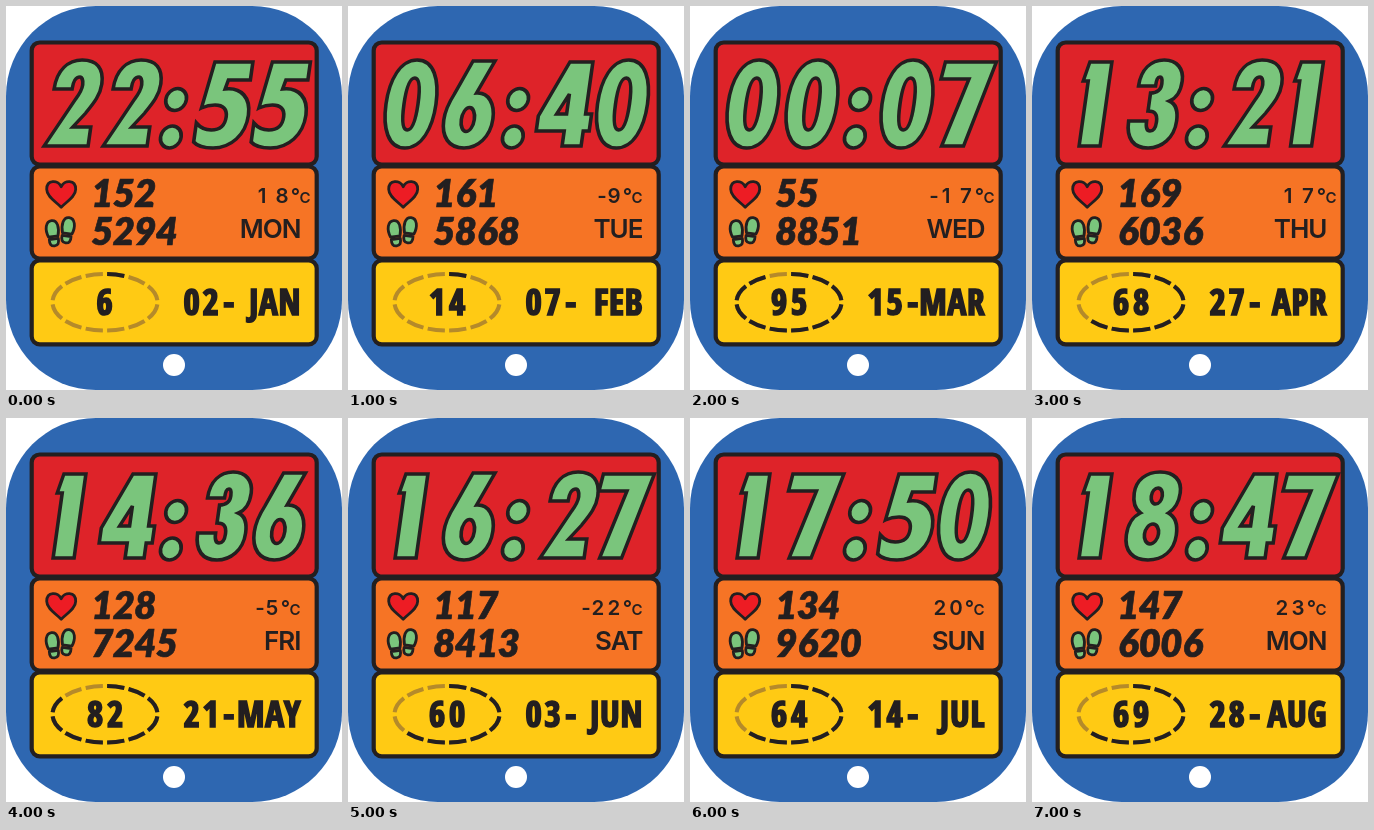
An HTML page for the animation above (8 s loop, 336 by 384 pixels).

```html
<!DOCTYPE html>
<html lang="en">
<head>
<meta charset="utf-8">
<title>Watch face</title>
<style>
  html, body { margin: 0; width: 100%; height: 100%; overflow: hidden; background: #fff; }
  svg { display: block; width: 336px; height: 384px; }
  .panel { stroke: #231f20; stroke-width: 4.2; }
  .time { fill: #7ac57c; fill-rule: evenodd; stroke: #231f20; stroke-width: 3.6; }
  .icon { stroke: #231f20; stroke-width: 2.8; stroke-linejoin: round; }
  .ring { fill: none; stroke-width: 4; }
  text { fill: #231f20; text-anchor: middle; }
  .slant {
    font: italic 900 38px Lato, "Open Sans", sans-serif;
    stroke: #231f20; stroke-width: .7;
  }
  .narrow {
    font: 800 35px "Open Sans Condensed", "Open Sans", "Roboto Condensed", sans-serif;
    font-stretch: 75%;
    stroke: #231f20; stroke-width: 1.7;
  }
  .temp { font: 600 20.5px Inter, sans-serif; }
  .unit { font: 600 15px Inter, sans-serif; }
  .day { font: 600 26px Inter, sans-serif; letter-spacing: -1px; }
  .end { text-anchor: end; }
  #month { letter-spacing: .8px; }
</style>
</head>
<body>
<svg viewBox="0 0 336 384">
  <rect width="336" height="384" rx="90" fill="#2e67b1"/>
  <g class="panel">
    <rect x="25.7" y="36.5" width="285" height="122" rx="8" fill="#de2329"/>
    <rect x="25.7" y="160.5" width="285" height="92" rx="8" fill="#f67425"/>
    <rect x="25.7" y="254.3" width="285" height="84" rx="8" fill="#ffca14"/>
  </g>

  <g id="time" class="time"></g>

  <path class="icon" fill="#ed1c24" transform="translate(.7 .7)" d="M54.5 200.5C49 195 40 190 40 182.5C40 172.5 51.5 173 54.5 180C57.5 173 69 172.5 69 182.5C69 190 60 195 54.5 200.5Z"/>
  <g class="icon" fill="#7ac57c">
    <g transform="translate(47 226.5) rotate(-7)">
      <path d="M-5 4C-8 -4 -6 -12 0 -12S7 -4 4.5 4Z"/>
      <path d="M-4.5 6.5H4.5C5 11 3.5 13.5 0 13.5S-5 11 -4.5 6.5Z"/>
    </g>
    <g transform="translate(61.5 223.5) rotate(8)">
      <path d="M-4.5 4C-7 -4 -6 -12 0 -12S8 -4 5 4Z"/>
      <path d="M-4.5 6.5H4.5C5 11 3.5 13.5 0 13.5S-5 11 -4.5 6.5Z"/>
    </g>
  </g>

  <text id="pulse" class="slant" y="201"></text>
  <text id="steps" class="slant" y="239"></text>
  <text id="temp" class="temp" y="197"></text>
  <text id="unit" class="unit" y="197"></text>
  <text id="day" class="day end" x="294.5" y="231.5"></text>

  <path class="ring" stroke="#b58a2a" pathLength="120" stroke-dasharray="0 1 8 1" d="M99 268a52.5 28.3 0 0 1 0 56.6a52.5 28.3 0 0 1 0 -56.6"/>
  <path id="ring" class="ring" stroke="#231f20" pathLength="120" d="M99 268a52.5 28.3 0 0 1 0 56.6a52.5 28.3 0 0 1 0 -56.6"/>
  <text id="power" class="narrow" y="308.5"></text>
  <text id="date" class="narrow" y="308.5"></text>
  <text id="month" class="narrow end" x="295.3" y="308.5"></text>

  <circle cx="168" cy="359" r="11" fill="#fff"/>
</svg>
<script>
const $ = id => document.getElementById(id);

// Upright digit outlines, centred on the origin.
const oval = (y, rx, ry) =>
  `M${-rx} ${y}A${rx} ${ry} 0 1 0 ${rx} ${y}A${rx} ${ry} 0 1 0 ${-rx} ${y}Z`;
const glyphs = {
  0: 'M0 -44C17 -44 25 -24 25 0S17 44 0 44S-25 24 -25 0S-17 -44 0 -44Z' +
     'M0 -26C-6 -26 -7 -12 -7 0S-6 26 0 26S7 12 7 0S6 -26 0 -26Z',
  1: 'M-11 -42H11V42H-10V-23H-15Z',
  2: 'M-17 -15C-17 -34 -7 -44 7 -44C22 -44 30 -35 30 -20C30 -8 24 0 18 9L7 23H25V42H-19' +
     'L6 -5C9 -10 11 -14 11 -19C11 -24 9 -27 7 -27C3 -27 1 -23 1 -15Z',
  3: 'M-18 -18C-18 -35 -9 -44 4 -44C17 -44 25 -35 25 -23C25 -13 22 -6 15 -3C22 0 25 8 25 17' +
     'C25 34 14 44 0 44C-14 44 -23 35 -23 17H-5C-5 24 -3 27 0 27C3 27 5 24 5 18' +
     'C5 10 2 7 -5 7V-11C2 -11 5 -14 5 -20C5 -25 4 -27 2 -27C0 -27 -1 -25 -1 -18Z',
  4: 'M-1 -42H22V10H28V27H22V42H3V27H-25V12ZM3 -10L-7 10H3Z',
  5: 'M-14 -42H24V-24H2L0 -15C16 -17 27 -6 27 11C27 31 14 44 -4 44C-13 44 -20 42 -24 38V19' +
     'C-20 23 -14 26 -8 26C1 26 5 21 5 13C5 5 0 1 -8 1C-13 1 -17 2 -21 4Z',
  6: 'M-3 -43H19L5 -11C17 -12 25 0 25 15C25 33 14 44 0 44C-15 44 -24 33 -24 16' +
     'C-24 6 -21 -2 -17 -10Z' + oval(15.5, 6.5, 12),
  7: 'M-25 -42H26L5 42H-17L1 -25H-27Z',
  8: 'M0 -44C14 -44 23 -36 23 -23C23 -14 20 -7 14 -3C22 1 25 9 25 19C25 35 15 44 0 44' +
     'S-25 35 -25 19C-25 9 -22 1 -14 -3C-20 -7 -23 -14 -23 -23C-23 -36 -14 -44 0 -44Z' +
     oval(-20, 5.5, 8) + oval(18, 7, 10),
  ':': oval(-4.5, 10.3, 11) + oval(33, 10.3, 11)
};
const slots = [63, 122, 169.5, 217, 274.5];

// time, pulse, steps, temperature, weekday, charge, lit dashes, date, month
const faces = [
  ['22:55', '152', '5294', '18', 'MON', '6', 1, '02-', 'JAN'],
  ['06:40', '161', '5868', '-9', 'TUE', '14', 1, '07-', 'FEB'],
  ['00:07', '55', '8851', '-17', 'WED', '95', 11, '15-', 'MAR'],
  ['13:21', '169', '6036', '17', 'THU', '68', 8, '27-', 'APR'],
  ['14:36', '128', '7245', '-5', 'FRI', '82', 10, '21-', 'MAY'],
  ['16:27', '117', '8413', '-22', 'SAT', '60', 8, '03-', 'JUN'],
  ['17:50', '134', '9620', '20', 'SUN', '64', 8, '14-', 'JUL'],
  ['18:47', '147', '6006', '23', 'MON', '69', 8, '28-', 'AUG']
];

function put(id, text, xs) {
  $(id).textContent = text;
  if (xs) $(id).setAttribute('x', xs.join(' '));
}

const row = (text, x, step) => [...text].map((_, i) => x + i * step);

// A reading with a "1" sits further right and is spaced wider.
function putTemp(value) {
  const wide = value.includes('1');
  const shift = wide ? 10 : 0;
  const digits = value.replace('-', '');
  const step = wide ? 20 : 16;
  const xs = row(digits, 266 + shift - (digits.length - 1) * step, step);
  if (value !== digits) xs.unshift(xs[0] - 12);
  put('temp', value + '°', [...xs, 279.5 + shift]);
  put('unit', 'C', [289 + shift]);
}

function draw([time, pulse, steps, temp, day, power, lit, date, month]) {
  $('time').innerHTML = [...time].map((c, i) =>
    `<path transform="translate(${slots[i]} 98) skewX(-8)" d="${glyphs[c]}"/>`).join('');
  put('pulse', pulse, row(pulse, 96.3, 21.5));
  put('steps', steps, row(steps, 96.3, 21.5));
  putTemp(temp);
  put('day', day);
  put('power', power, power.length > 1 ? [89, 109] : [98.5]);
  put('date', date, [185.7, 204.7, 222.7]);
  put('month', month);
  $('ring').setAttribute('stroke-dasharray', '0 1 ' + '8 2 '.repeat(lit) + '0 200');
}

// Keep the date readable where no condensed face is available.
put('month', 'MAR');
const span = $('month').getComputedTextLength();
if (span > 74) {
  for (const id of ['month', 'date', 'power']) $(id).style.fontSize = 35 * 70 / span + 'px';
}

let shown = -1;
function tick() {
  const i = Math.floor(performance.now() / 1000) % faces.length;
  if (i !== shown) draw(faces[shown = i]);
  requestAnimationFrame(tick);
}
tick();
</script>
</body>
</html>
```
